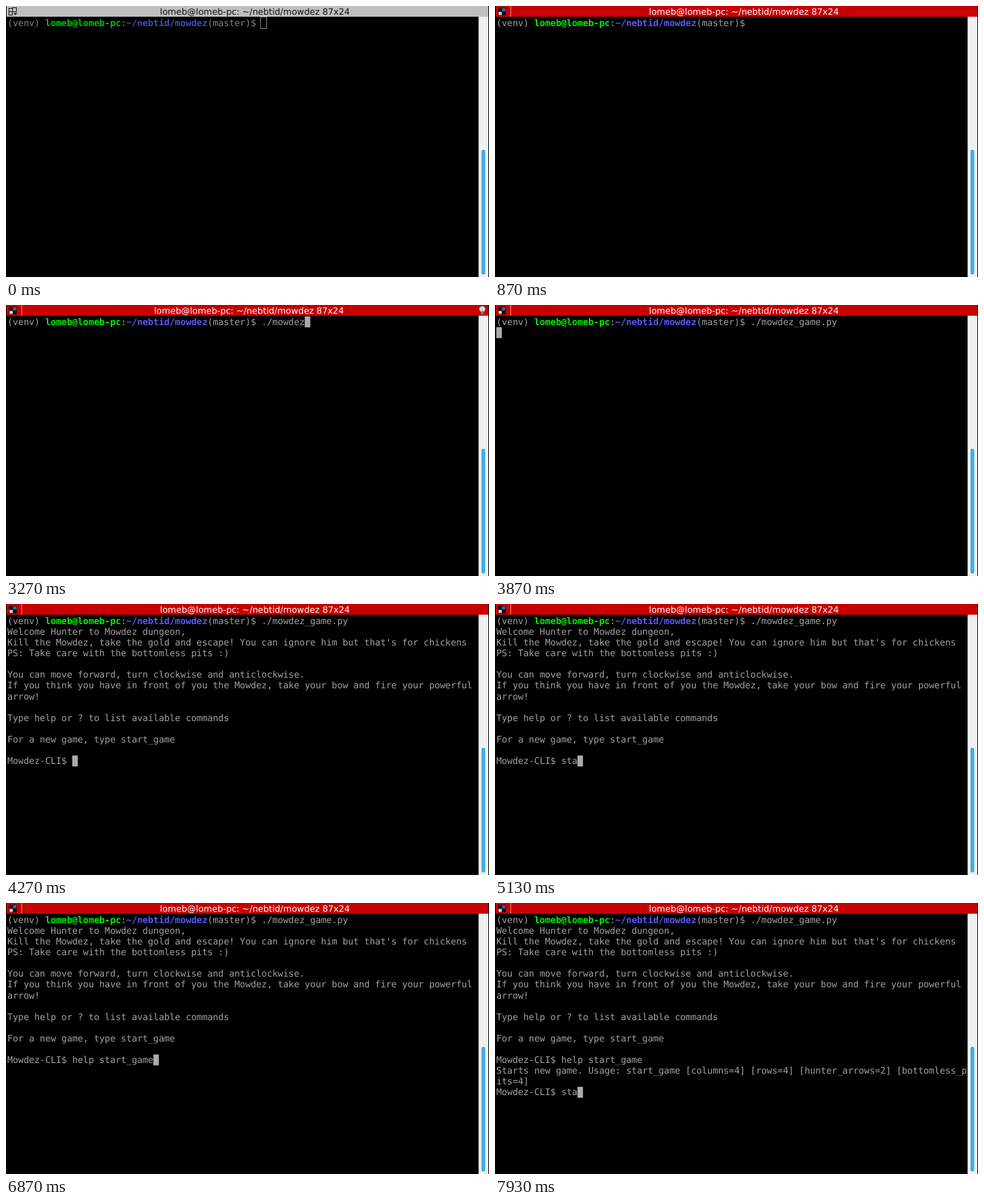
Recreate the animation shown at these times as an HTML page with a canvas. Size 720 by 405 pixels, loop 8000 ms.

```html
<!DOCTYPE html>
<html lang="en">
<head>
<meta charset="utf-8">
<title>Terminal session</title>
<style>
html, body { margin: 0; height: 100%; overflow: hidden; background: #000; }
canvas { display: block; width: 100vw; height: 100vh; }
</style>
</head>
<body>
<canvas id="stage" width="720" height="405"></canvas>
<script>
const ctx = document.getElementById('stage').getContext('2d');
const LOOP = 8000;
const CELL_W = 8.06, CELL_H = 16.1, LEFT = 2, TOP = 17.1;
const BASELINE = 12.7;
const MONO = '13.6px "DejaVu Sans Mono", monospace';
const FOCUS = 130, BELL_ON = 2800, BELL_OFF = 3600;
const START = 3990, HELP = 7070;
const BLINK = 1200;
const TITLE = 'lomeb@lomeb-pc: ~/nebtid/mowdez 87x24';

const LIVE = {
  text: '#a0a0a0', user: '#00f000', path: '#5858f4',
  cursor: '#aaaaaa', bar: '#c80000', title: '#ffffff'
};
const IDLE = {
  text: '#808080', user: '#00c000', path: '#4646c4',
  cursor: '#888888', bar: '#c0bebf', title: '#101010'
};

const shellPrompt = [
  ['(venv) ', 'text'], ['lomeb@lomeb-pc', 'user'], [':', 'text'],
  ['~/nebtid/mowdez', 'path'], ['(master)$ ', 'text']
];
const SHELL_LEN = shellPrompt.reduce((n, [text]) => n + text.length, 0);
const GAME_PROMPT = 'Mowdez-CLI$ ';

const intro = [
  'Welcome Hunter to Mowdez dungeon,',
  "Kill the Mowdez, take the gold and escape! You can ignore him but that's for chickens",
  'PS: Take care with the bottomless pits :)',
  '',
  'You can move forward, turn clockwise and anticlockwise.',
  'If you think you have in front of you the Mowdez, take your bow and fire your powerful',
  'arrow!',
  '',
  'Type help or ? to list available commands',
  '',
  'For a new game, type start_game'
];
const usage = [
  'Starts new game. Usage: start_game [columns=4] [rows=4] [hunter_arrows=2] [bottomless_p',
  'its=4]'
];

// Each entry: time, row, what has been typed on that row.
const typing = [
  [FOCUS, 0, ''], [1800, 0, '.'], [2200, 0, './'], [2330, 0, './m'],
  [2470, 0, './mo'], [2600, 0, './mow'], [BELL_ON, 0, './mowdez'],
  [3330, 0, './mowdez_'], [3530, 0, './mowdez_game.py'],
  [3870, 1, ''], [START, 13, ''],
  [4870, 13, 's'], [5000, 13, 'st'], [5070, 13, 'sta'],
  [5400, 13, 'st'], [5470, 13, 's'], [5600, 13, ''],
  [5800, 13, 'h'], [5930, 13, 'he'], [6000, 13, 'hel'], [6130, 13, 'help'],
  [6270, 13, 'help '], [6400, 13, 'help s'], [6470, 13, 'help st'],
  [6540, 13, 'help sta'], [6670, 13, 'help start_game'],
  [HELP, 16, ''], [7530, 16, 's'], [7670, 16, 'st'], [7730, 16, 'sta']
];

function box(x, y, w, h, color) {
  ctx.fillStyle = color;
  ctx.fillRect(x, y, w, h);
}

function write(text, col, row, color, weight = 'normal') {
  ctx.font = `${weight} ${MONO}`;
  ctx.textAlign = 'left';
  ctx.fillStyle = color;
  const y = TOP + row * CELL_H + BASELINE;
  [...text].forEach((ch, i) => ctx.fillText(ch, LEFT + (col + i) * CELL_W, y));
}

function promptLength(row) {
  if (row === 0) return SHELL_LEN;
  return row === 1 ? 0 : GAME_PROMPT.length;
}

function drawIcon(live) {
  if (live) {
    box(4.5, 2.5, 11.5, 11.5, '#200808');
    box(10.5, 3.3, 4.8, 4.8, '#1673c4');
    box(5.3, 8.8, 4.8, 4.6, '#d4d4d4');
    box(23, 0, 1, 16, '#e58c8c');
    return;
  }
  ctx.strokeStyle = '#151515';
  ctx.lineWidth = 1;
  ctx.strokeRect(9.5, 2.5, 6, 6);
  ctx.strokeRect(4.5, 8.5, 5, 5);
  ctx.strokeRect(4.5, 3.5, 5, 5);
  ctx.fillStyle = '#151515';
  ctx.beginPath();
  ctx.moveTo(11, 10.5);
  ctx.lineTo(17, 10.5);
  ctx.lineTo(14, 13.5);
  ctx.fill();
}

function drawBulb() {
  ctx.fillStyle = '#e4e6e6';
  ctx.strokeStyle = '#8d8585';
  ctx.lineWidth = 1;
  ctx.beginPath();
  ctx.arc(710, 6.2, 4.4, 0, Math.PI * 2);
  ctx.fill();
  ctx.stroke();
  box(708, 9.5, 4, 4.5, '#777777');
  box(709.3, 5, 1.4, 5, '#a5a5a5');
}

function drawBar(t, theme) {
  const bell = t >= BELL_ON && t < BELL_OFF;
  box(1, 0, 718, 16, theme.bar);
  drawIcon(theme === LIVE);
  ctx.font = '13px "DejaVu Sans", sans-serif';
  ctx.textAlign = 'center';
  ctx.fillStyle = theme.title;
  ctx.fillText(TITLE, bell ? 362.2 : 371, 12.6);
  if (bell) drawBulb();
}

function drawScrollbar() {
  box(704.5, 16, 14.5, 389, '#eff0f1');
  ctx.fillStyle = '#3daee9';
  ctx.beginPath();
  ctx.roundRect(708.8, 214.8, 5.6, 186.4, 2.8);
  ctx.fill();
}

function drawCursor(t, [since, row, text], theme) {
  const x = LEFT + (promptLength(row) + text.length) * CELL_W;
  const y = TOP + row * CELL_H;
  if (theme === IDLE) {
    ctx.strokeStyle = theme.cursor;
    ctx.lineWidth = 1;
    ctx.strokeRect(Math.floor(x) - 0.5, 16.5, 9, 17);
  } else if ((t - since) % BLINK < BLINK / 2) {
    box(x, y, CELL_W + 0.2, CELL_H + 0.2, theme.cursor);
  }
}

function drawShellPrompt(theme) {
  let col = 0;
  for (const [text, key] of shellPrompt) {
    write(text, col, 0, theme[key], key === 'text' ? 'normal' : 'bold');
    col += text.length;
  }
}

function drawOutput(lines, row, color) {
  lines.forEach((line, i) => write(line, 0, row + i, color));
}

function draw(t) {
  const theme = t < FOCUS ? IDLE : LIVE;
  const past = typing.filter(([time]) => time <= t);

  box(0, 0, 720, 405, '#000');
  drawBar(t, theme);
  drawScrollbar();
  drawShellPrompt(theme);
  if (t >= START) drawOutput([...intro, '', GAME_PROMPT], 1, theme.text);
  if (t >= HELP) drawOutput([...usage, GAME_PROMPT], 14, theme.text);

  const rows = new Map(past.map(([, row, text]) => [row, text]));
  rows.forEach((text, row) => write(text, promptLength(row), row, theme.text));
  drawCursor(t, past[past.length - 1] || typing[0], theme);
}

function tick(now) {
  draw(now % LOOP);
  requestAnimationFrame(tick);
}

ctx.textRendering = 'geometricPrecision';
requestAnimationFrame(tick);
</script>
</body>
</html>
```
